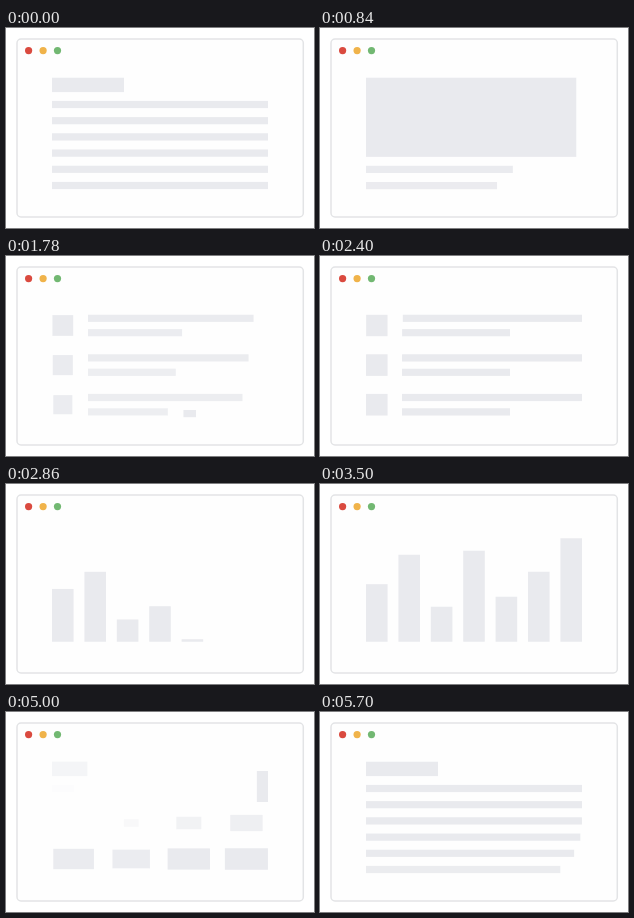
Write an HTML page that moves like this. It is 308 px wide and 200 px high and loops after 5720 ms.

```html
<!DOCTYPE html>
<html lang="en">
<head>
<meta charset="utf-8">
<title>Page layouts</title>
<style>
  html, body { margin: 0; width: 100%; height: 100%; overflow: hidden; background: #fff; }
  svg { display: block; width: 308px; height: 200px; }
</style>
</head>
<body>
<svg viewBox="0 0 308 200">
  <rect x="11" y="11" width="286.3" height="178" rx="4" fill="#fefefe" stroke="#e3e4e6" stroke-width="1.5"/>
  <circle cx="22.6" cy="22.6" r="3.6" fill="#da4a3f"/>
  <circle cx="37.1" cy="22.6" r="3.6" fill="#f0b34a"/>
  <circle cx="51.5" cy="22.6" r="3.6" fill="#72b872"/>
  <g id="blocks" fill="#e9eaee"></g>
</svg>
<script>
const LOOP = 5720, ENTER = 600, LEAVE = 400;
const LEFT = 46, FULL = 216, LINE = 7.2;
const group = document.getElementById('blocks');
const blocks = [];

// kind: wipe (left to right), pop (from centre), bar (from baseline), cell (wipe in, pop out)
function add(kind, x, y, w, h, start, end) {
  const node = document.createElementNS('http://www.w3.org/2000/svg', 'rect');
  group.appendChild(node);
  blocks.push({ node, kind, x, y, w, h, start, end });
}

function addArticle() {
  add('wipe', LEFT, 49.7, 72, 14.4, 4880, 150);
  for (let i = 0; i < 6; i++) {
    add('wipe', LEFT, 72.9 + i * 16.2, FULL, LINE, 4980 + i * 80, 195 + i * 45);
  }
}

function addPicture() {
  add('wipe', LEFT, 49.7, FULL, 79.2, 420, 1285);
  add('wipe', LEFT, 137.8, 155.5, LINE, 470, 1338);
  add('wipe', LEFT, 154, 144, LINE, 510, 1393);
}

function addList() {
  for (let row = 0; row < 3; row++) {
    const y = 58.7 + row * 39.6, leave = 2310 + row * 45;
    add('pop', LEFT, y, 21.6, 21.6, 1385 + row * 45, leave);
    add('wipe', 82, y, 180, LINE, 1440 + row * 27, leave + 25);
    add('wipe', 82, y + 14.4, 108, LINE, 1484 + row * 40, leave + 50);
  }
}

function addChart() {
  [58, 87, 35, 91, 45, 70, 104].forEach((height, i) => {
    add('bar', LEFT + i * 32.4, 157.7 - height, 21.6, height, 2530 + i * 80, 3420 + i * 45);
  });
}

function addTable() {
  add('wipe', LEFT, 59, FULL, 31, 3680, 4608);
  const starts = [3906, 3796, 3958, 3796, 3958, 3892, 3958, 4096];
  const leaveOrder = [0, 1, 2, 3, 5, 4, 6, 7];
  starts.forEach((start, i) => {
    const x = LEFT + (i % 4) * 57.6, y = 100.2 + Math.floor(i / 4) * 36;
    add('cell', x, y, 43.2, 21.6, start, 4605 + leaveOrder[i] * 48);
  });
}

const clamp = v => Math.min(1, Math.max(0, v));
const easeOut = v => 1 - (1 - clamp(v)) ** 3;
const easeIn = v => clamp(v) ** 3;

function place(b, t) {
  const wraps = b.start > b.end;
  const entering = wraps && t >= b.start;
  const shown = wraps && !entering ? 1 : easeOut((t - b.start) / ENTER);
  const gone = entering ? 0 : easeIn((t - b.end) / LEAVE);
  const left = 1 - gone;
  let { x, y, w, h } = b, opacity = shown;

  if (b.kind === 'wipe') {
    x += w * gone;
    w *= Math.max(0, shown - gone);
  } else if (b.kind === 'bar') {
    y += h * (1 - shown * left);
    h *= shown * left;
    opacity = 1;
  } else {
    const scale = b.kind === 'pop' ? shown * left : left;
    x += w * (1 - scale) / 2;
    y += h * (1 - scale) / 2;
    w *= b.kind === 'cell' ? shown * scale : scale;
    h *= scale;
    opacity *= left;
  }
  const values = { x, y, width: w, height: h, opacity };
  for (const key in values) b.node.setAttribute(key, values[key].toFixed(2));
}

function render(now) {
  const t = now % LOOP;
  blocks.forEach(b => place(b, t));
}

[addArticle, addPicture, addList, addChart, addTable].forEach(build => build());

const origin = performance.now();
function tick() {
  render(performance.now() - origin);
  requestAnimationFrame(tick);
}
tick();
</script>
</body>
</html>
```
